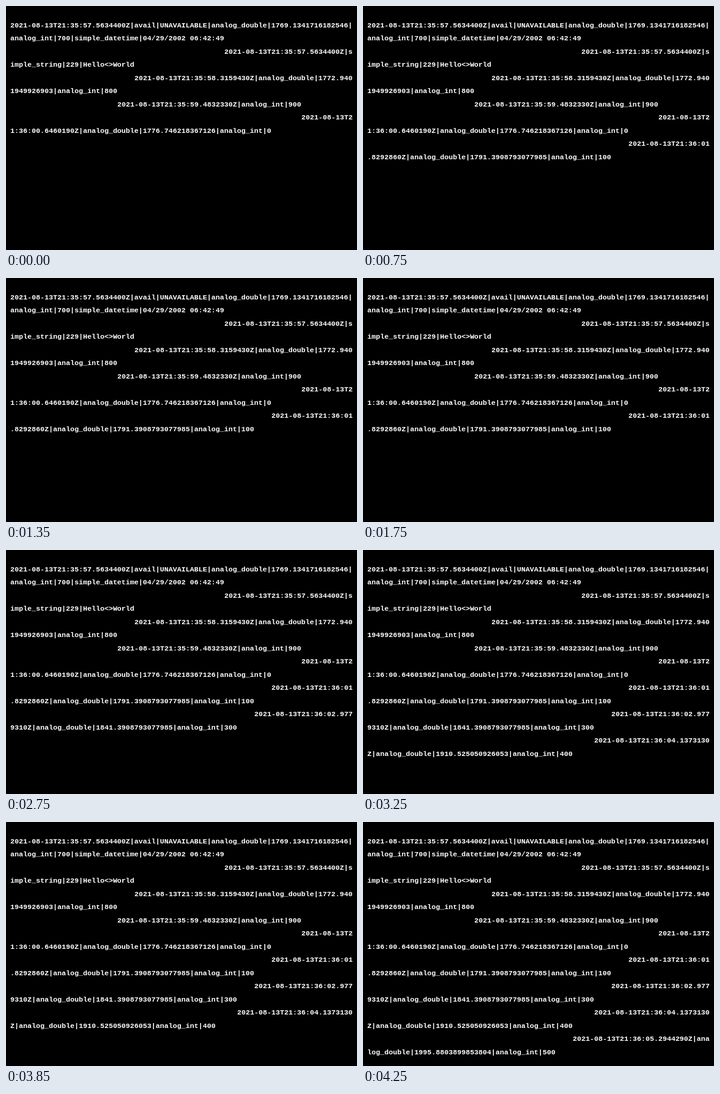
Recreate the animation shown at these times as an HTML page with a canvas. Size 574 by 398 pixels, loop 5250 ms.

```html
<!DOCTYPE html>
<html lang="en">
<head>
<meta charset="utf-8">
<title>Terminal data stream</title>
<style>
  html, body { margin: 0; width: 100%; height: 100%; overflow: hidden; background: #000; }
  canvas { display: block; }
</style>
</head>
<body>
<canvas id="screen" width="574" height="398"></canvas>
<script>
const LOOP = 5250;
const COLUMNS = 80;
const CELL = 7;
const LEFT = 7;
const FIRST_BASELINE = 34.5;
const LINE_HEIGHT = 21.5;

const record = (at, clock, fields) => ({ at, text: `2021-08-13T21:${clock}Z|${fields}` });

const records = [
  record(0, "35:57.5634400", "avail|UNAVAILABLE|analog_double|1769.1341716182546|analog_int|700|simple_datetime|04/29/2002 06:42:49"),
  record(0, "35:57.5634400", "simple_string|229|Hello<>World"),
  record(0, "35:58.3159430", "analog_double|1772.9401949926903|analog_int|800"),
  record(0, "35:59.4832330", "analog_int|900"),
  record(0, "36:00.6460190", "analog_double|1776.746218367126|analog_int|0"),
  record(750, "36:01.8292860", "analog_double|1791.3908793077985|analog_int|100"),
  record(2000, "36:02.9779310", "analog_double|1841.3908793077985|analog_int|300"),
  record(3250, "36:04.1373130", "analog_double|1910.525050926053|analog_int|400"),
  record(4250, "36:05.2944290", "analog_double|1995.8803899853804|analog_int|500")
];

// Line feeds arrive without carriage returns, so each record starts
// one row down in the column where the previous one ended.
function layOut(records) {
  const runs = [];
  let row = 0, column = 0;
  for (const { at, text } of records) {
    let rest = text;
    while (rest) {
      const part = rest.slice(0, COLUMNS - column);
      runs.push({ at, row, column, text: part });
      rest = rest.slice(part.length);
      column += part.length;
      if (rest) {
        row++;
        column = 0;
      }
    }
    row++;
  }
  return runs;
}

const runs = layOut(records);
const ctx = document.getElementById("screen").getContext("2d", { alpha: false });

function draw(time) {
  ctx.fillStyle = "#000";
  ctx.fillRect(0, 0, 574, 398);
  ctx.fillStyle = "#fff";
  ctx.font = 'bold 11.667px "Courier New", "Liberation Mono", monospace';
  ctx.textBaseline = "alphabetic";
  for (const { at, row, column, text } of runs) {
    if (time >= at) {
      ctx.fillText(text, LEFT + column * CELL, Math.round(FIRST_BASELINE + row * LINE_HEIGHT));
    }
  }
}

const start = performance.now();
function tick() {
  draw((performance.now() - start) % LOOP);
  requestAnimationFrame(tick);
}
tick();
</script>
</body>
</html>
```
